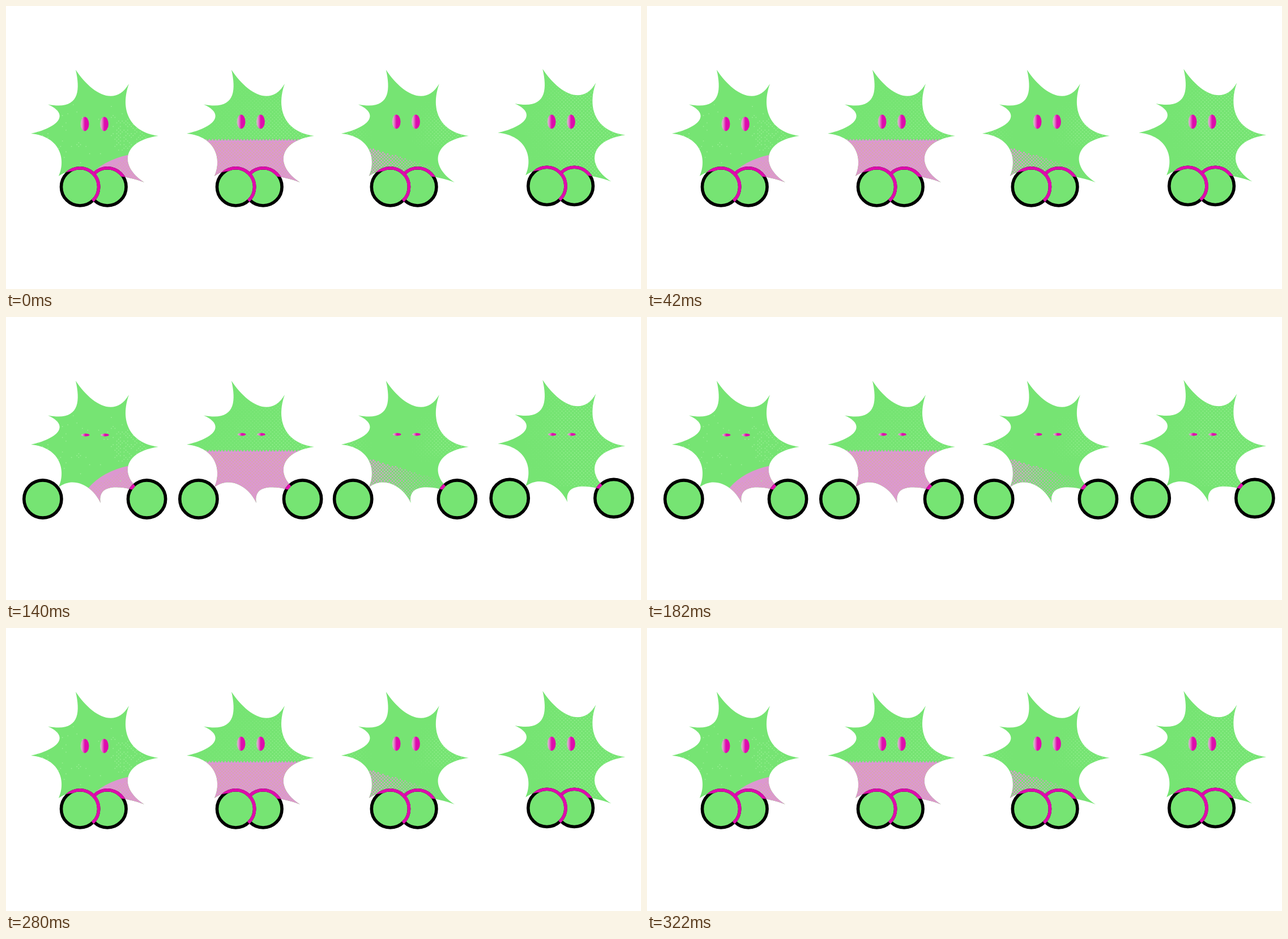
Recreate the animation shown at these times as an HTML page with a canvas. Size 1121 by 499 pixels, loop 350 ms.

```html
<!DOCTYPE html>
<html>
<head>
<meta charset="utf-8">
<style>
html, body { margin: 0; width: 100%; height: 100%; overflow: hidden; background: #fff; }
canvas { display: block; }
</style>
</head>
<body>
<canvas id="stage" width="1121" height="499"></canvas>
<script>
const ctx = document.getElementById('stage').getContext('2d');
const GREEN = '#76e473', MAGENTA = '#de0bac', PINK = '#dc98d0', TAN = '#d6b094', LIGHT = '#9ef098';
const TAU = Math.PI * 2;

const body = new Path2D(`M123 112.5 C150 153 192 180 217 137 C201 182 217 222 269 229
  C208 237 197 280 244 311 C210 298 160 290 167 328 C153 298 120 280 93 300
  C106 272 97 230 44 225 C90 215 115 192 74 173.5 C128 184 132 152 123 112.5 Z`);

// Wheel centres and eye half-height for each pose
const poses = [
  { left: 130.6, right: 179, y: 318.9, eye: 12.4 },
  { left: 96.7, right: 214.6, y: 320.8, eye: 12.4 },
  { left: 64.9, right: 248.6, y: 321, eye: 2.6 }
];
const order = [0, 1, 2, 1, 0];
const STEP = 70;

const clamp = v => Math.max(0, Math.min(1, v));
const noise = (x, y) => {
  const v = Math.sin(x * 12.9898 + y * 78.233) * 43758.5453;
  return v - Math.floor(v);
};

// Staggered screen of dots; radius(x, y) gives each dot's size
function halftone(c, color, pitch, radius) {
  c.fillStyle = color;
  c.beginPath();
  for (let row = 0, y = 110; y < 330; y += pitch, row++) {
    for (let x = 42 + (row % 2) * pitch; x < 270; x += pitch * 2) {
      const r = radius(x, y);
      if (r <= 0) continue;
      c.moveTo(x + r, y);
      c.arc(x, y, r, 0, TAU);
    }
  }
  c.fill();
}

function pinkArea(c, outline) {
  c.fillStyle = PINK;
  c.fill(new Path2D(outline));
}

const skins = [
  c => {
    pinkArea(c, 'M145 302 Q170 272 218 262 L250 262 V330 H145 Z');
    halftone(c, TAN, 2.8, (x, y) => y > 268 + (214 - x) * .5 ? .75 : 0);
    halftone(c, LIGHT, 3.2, (x, y) => {
      const chance = y > 255 || y < 180 ? .02 : .05 + .5 * clamp((x - 170) / 30) * clamp((y - 185) / 20);
      return noise(x, y) < chance ? .85 : 0;
    });
  },
  c => {
    pinkArea(c, 'M40 237 H270 V330 H40 Z');
    halftone(c, PINK, 2.8, (x, y) => y > 235 && y < 240 ? 1.4 : 0);
    halftone(c, TAN, 2.8, (x, y) => y > 239 ? 1.1 - (y - 239) / 180 : 0);
    halftone(c, LIGHT, 3.2, (x, y) => y < 232 ? .2 + .65 * clamp((x + y - 240) / 180) : 0);
  },
  c => {
    halftone(c, PINK, 2.8, (x, y) => {
      const edge = 252 + Math.max(0, x - 100) * .3;
      return y > edge ? 1.65 - Math.max(0, x - 100) / 95 : 0;
    });
    halftone(c, LIGHT, 3.2, (x, y) => {
      const left = clamp((105 - x) / 40) * clamp((y - 205) / 15) * clamp((245 - y) / 10);
      const right = clamp((x - 160) / 50) * clamp((y - 160) / 40) * clamp((265 - y) / 30);
      return .85 * Math.max(left, right);
    });
  },
  c => halftone(c, LIGHT, 3.2, (x, y) =>
    y < 300 ? .85 * clamp((x - 75 - Math.abs(y - 205) * .3) / 75) : 0)
];

const actors = [
  { x: 0, y: 0, eyeX: 139, eyeY: 208, blinkY: 208 },
  { x: 275, y: 0, eyeX: 140, eyeY: 204, blinkY: 207 },
  { x: 547.8, y: 0, eyeX: 141.2, eyeY: 204, blinkY: 207 },
  { x: 824.3, y: -1.5, eyeX: 138.7, eyeY: 205.5, blinkY: 208.5 }
];

// The bodies never change, so they are painted once
const bodies = document.createElement('canvas');
bodies.width = 1121;
bodies.height = 499;
const bodyCtx = bodies.getContext('2d');
actors.forEach((a, i) => {
  bodyCtx.save();
  bodyCtx.translate(a.x, a.y);
  bodyCtx.clip(body);
  bodyCtx.fillStyle = GREEN;
  bodyCtx.fillRect(40, 100, 235, 235);
  skins[i](bodyCtx);
  bodyCtx.restore();
});

function circle(x, y, r) {
  const path = new Path2D();
  path.arc(x, y, r, 0, TAU);
  return path;
}

// The rim turns magenta wherever it crosses one of the backing shapes
function wheel(x, y, backing) {
  const rim = circle(x, y, 33.1);
  ctx.fillStyle = GREEN;
  ctx.fill(rim);
  ctx.lineWidth = 5.6;
  ctx.strokeStyle = '#000';
  ctx.stroke(rim);
  ctx.strokeStyle = MAGENTA;
  for (const shape of backing) {
    ctx.save();
    ctx.clip(shape);
    ctx.stroke(rim);
    ctx.restore();
  }
}

function eye(x, y, ry) {
  const shade = ctx.createLinearGradient(x - 7.5, 0, x + 7.5, 0);
  shade.addColorStop(0, '#bccdb8');
  shade.addColorStop(.2, '#e096cc');
  shade.addColorStop(.52, MAGENTA);
  ctx.fillStyle = shade;
  ctx.beginPath();
  ctx.ellipse(x, y, 7.5, ry, 0, 0, TAU);
  ctx.fill();
}

function draw(pose) {
  ctx.fillStyle = '#fff';
  ctx.fillRect(0, 0, 1121, 499);
  ctx.drawImage(bodies, 0, 0);
  const blink = pose.eye < 5;
  for (const a of actors) {
    ctx.save();
    ctx.translate(a.x, a.y);
    const ex = a.eyeX + (blink ? 1 : 0), ey = blink ? a.blinkY : a.eyeY;
    eye(ex, ey, pose.eye);
    eye(ex + 34.4, ey, pose.eye);
    wheel(pose.right, pose.y, [body]);
    wheel(pose.left, pose.y, [body, circle(pose.right, pose.y, 35.9)]);
    ctx.restore();
  }
}

const start = performance.now();
function tick() {
  const step = Math.floor((performance.now() - start) / STEP) % order.length;
  draw(poses[order[step]]);
  requestAnimationFrame(tick);
}
tick();
</script>
</body>
</html>
```
